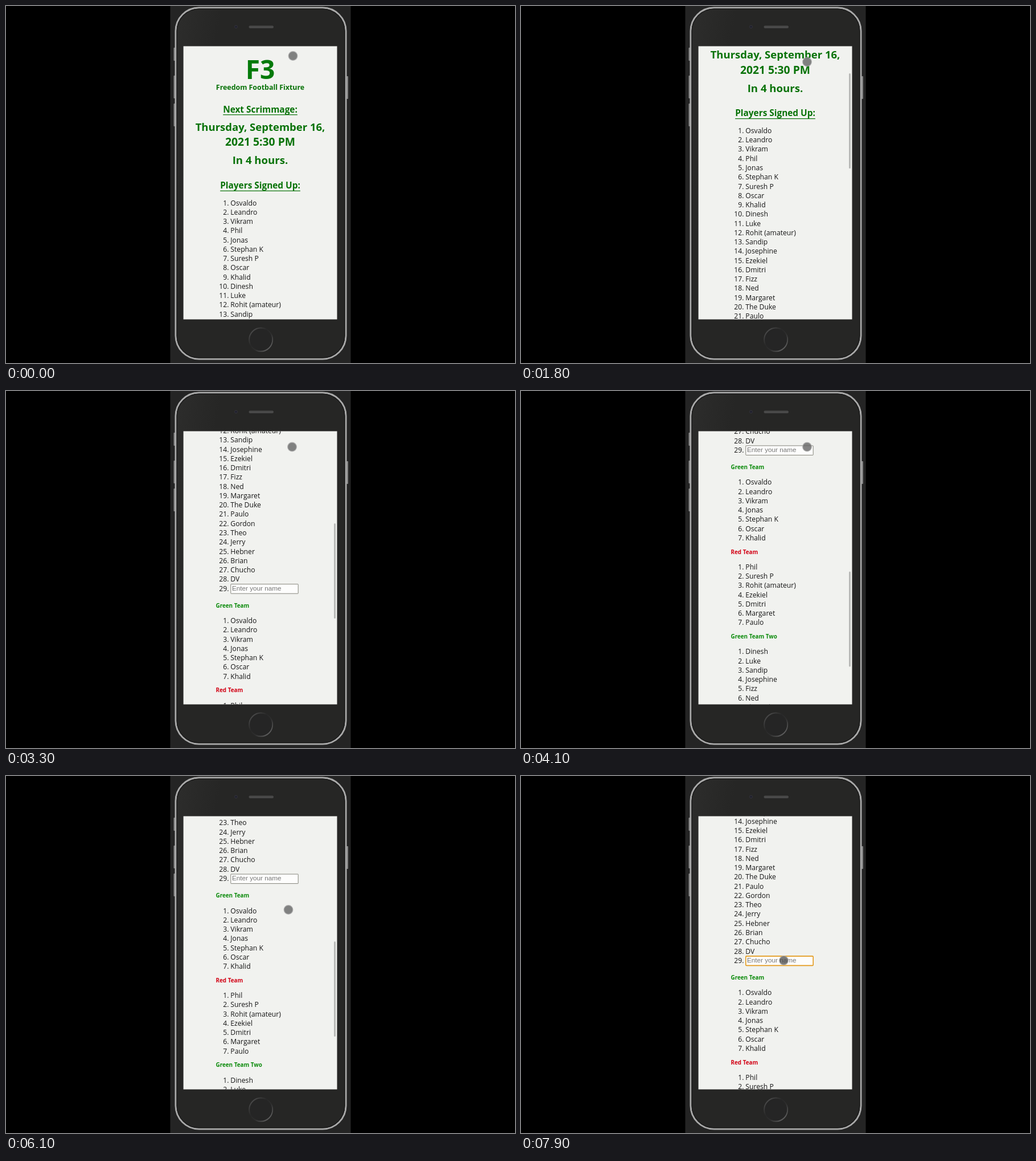
Write an HTML page that moves like this. It is 894 px wide and 626 px high and loops after 8000 ms.

```html
<!DOCTYPE html>
<html lang="en">
<head>
<meta charset="utf-8">
<title>Signup on a phone</title>
<style>
  html, body { margin: 0; width: 100%; height: 100%; overflow: hidden; background: #000; }
  svg { display: block; width: 894px; height: 626px; }
  text { font-family: "Open Sans", "Noto Sans", sans-serif; font-size: 12.2px; fill: #161616; white-space: pre; }
  .bold { font-weight: 700; fill: #077207; }
  .mid { text-anchor: middle; }
  .end { text-anchor: end; }
  .hint { font-family: "Liberation Sans", Arial, sans-serif; font-size: 11.7px; fill: #777; }
</style>
</head>
<body>
<svg viewBox="0 0 894 626">
  <defs>
    <clipPath id="screen"><rect x="311.6" y="70.6" width="269.9" height="478.9"/></clipPath>
    <linearGradient id="body" x1="0" y1="0" x2="1" y2="0.3">
      <stop offset="0" stop-color="#2d2d2c"/>
      <stop offset="0.25" stop-color="#262625"/>
      <stop offset="1" stop-color="#262625"/>
    </linearGradient>
    <linearGradient id="ring" x1="0" y1="0" x2="1" y2="1">
      <stop offset="0" stop-color="#5a5a5a"/>
      <stop offset="0.4" stop-color="#282828"/>
      <stop offset="0.6" stop-color="#2e2e2e"/>
      <stop offset="1" stop-color="#777"/>
    </linearGradient>
  </defs>
  <rect width="894" height="626"/>
  <rect x="288.5" width="317" height="626" fill="#242424"/>
  <g fill="#858585">
    <rect x="294.5" y="73" width="3" height="23" rx="1"/>
    <rect x="294.5" y="122" width="3" height="40" rx="1"/>
    <rect x="294.5" y="171" width="3" height="40" rx="1"/>
    <rect x="598" y="123" width="3" height="40" rx="1"/>
  </g>
  <rect x="298" y="3" width="299" height="616" rx="41" fill="url(#body)" stroke="#a9a9a9" stroke-width="3"/>
  <rect x="300.2" y="5.2" width="294.6" height="611.6" rx="38.8" fill="none" stroke="#1b1b1b" stroke-width="1.4"/>
  <circle cx="404" cy="36.5" r="2.5" fill="#20202c" stroke="#34343c"/>
  <rect x="426.5" y="34.5" width="43.5" height="4.5" rx="2.2" fill="#494949"/>
  <circle cx="447.7" cy="585" r="20.5" fill="#252525" stroke="url(#ring)" stroke-width="1.8"/>
  <g clip-path="url(#screen)">
    <rect x="311" y="70" width="271" height="480" fill="#f1f2ef"/>
    <g id="page"></g>
    <rect id="thumb" x="576" width="3" height="167" rx="1.5" fill="#b9bab8"/>
  </g>
  <circle id="touch" r="7.8" stroke="#aaa" stroke-opacity=".75" stroke-width="1.4"/>
</svg>
<script>
const LOOP = 8000, STEP = 100;
const ROW = 16.26, NOTCH = 64.9, NOTCH_TIME = 150, MAX_SCROLL = 866.5;
const GREEN = '#0a8a0a', RED = '#d20014';
const byId = id => document.getElementById(id);
const page = byId('page'), thumb = byId('thumb'), touch = byId('touch');

function add(tag, attrs, content = '') {
  const el = document.createElementNS('http://www.w3.org/2000/svg', tag);
  for (const key in attrs) el.setAttribute(key, attrs[key]);
  el.textContent = content;
  return page.appendChild(el);
}

function heading(content, y, size, fill = '#077207') {
  return add('text', { class: 'bold mid', x: 446.5, y, style: `font-size:${size}px;fill:${fill}` }, content);
}

function underlined(content, y) {
  const half = heading(content, y, 15.4).getComputedTextLength() / 2;
  add('rect', { x: 446.5 - half, y: y + 3.6, width: half * 2, height: 1.2, fill: '#077207' });
}

function numberLabel(n, y) {
  add('text', { class: 'end', x: 391.5, y }, n + '.');
}

function list(names, y) {
  names.forEach((name, i) => {
    numberLabel(i + 1, y + i * ROW);
    add('text', { x: 394.3, y: y + i * ROW }, name);
  });
}

const players = ['Osvaldo', 'Leandro', 'Vikram', 'Phil', 'Jonas', 'Stephan K', 'Suresh P', 'Oscar',
  'Khalid', 'Dinesh', 'Luke', 'Rohit (amateur)', 'Sandip', 'Josephine', 'Ezekiel', 'Dmitri', 'Fizz',
  'Ned', 'Margaret', 'The Duke', 'Paulo', 'Gordon', 'Theo', 'Jerry', 'Hebner', 'Brian', 'Chucho', 'DV'];

const teams = [
  ['Green Team', GREEN, [1, 2, 3, 5, 6, 8, 9]],
  ['Red Team', RED, [4, 7, 12, 15, 16, 19, 21]],
  ['Green Team Two', GREEN, [10, 11, 13, 14, 17, 18, 20]],
  ['Green Team Two', RED, [22, 23, 24, 25, 26, 27, 28]]
];

heading('F3', 127.5, 46, '#047a0a');
heading('Freedom Football Fixture', 146.5, 12.4);
underlined('Next Scrimmage:', 186.5);
heading('Thursday, September 16,', 218.8, 18.5);
heading('2021 5:30 PM', 245.3, 19.3);
heading('In 4 hours.', 277.3, 18.6);
underlined('Players Signed Up:', 320);
list(players, 349.6);
numberLabel(29, 349.6 + 28 * ROW);
const field = add('rect', { x: 394.8, y: 793, width: 118.4, height: 16.5, fill: '#fdfdfc' });
add('text', { class: 'hint', x: 397, y: 804.3 }, 'Enter your name');
teams.forEach(([title, color, members], i) => {
  const y = 834.2 + i * 148.5;
  add('text', { class: 'bold', x: 368.5, y, style: `font-size:9.9px;fill:${color}` }, title);
  list(members.map(n => players[n - 1]), y + 27.3);
});

// Wheel notches: start times of each step down and up
const down = [1450, 1670, 1890, 2110, 2500, 2800, 3100, 3400, 3600, 3800, 4000, 4200, 4400, 4550];
const up = [5450, 5650, 5850, 5995, 6300, 6500];
const FOCUS_TIME = 7600;

// Touch point stops: time, x, y
const stops = [[0, 504, 87.5], [900, 502.5, 98], [4900, 502.5, 98], [5400, 496, 234.5],
  [6700, 496, 234.5], [7400, 461.5, 323.5], [LOOP, 461.5, 323.5]];

const clamp = v => Math.max(0, Math.min(1, v));
const ease = v => { v = clamp(v); return v * v * (3 - 2 * v); };
const travel = (times, t) => times.reduce((sum, start) => sum + NOTCH * ease((t - start) / NOTCH_TIME), 0);

function touchAt(t) {
  const i = stops.findIndex((s, k) => k > 0 && t <= s[0]);
  const [t0, x0, y0] = stops[i - 1], [t1, x1, y1] = stops[i];
  const p = ease((t - t0) / (t1 - t0));
  return [x0 + (x1 - x0) * p, y0 + (y1 - y0) * p];
}

function barOpacity(t) {
  const last = [...down, ...up].filter(start => start < t).pop();
  return last === undefined ? 0 : clamp(1 - (t - last - NOTCH_TIME - 500) / 200);
}

function render(t) {
  const scroll = Math.min(MAX_SCROLL, travel(down, t)) - travel(up, t);
  page.setAttribute('transform', `translate(0 ${-scroll})`);
  thumb.setAttribute('y', 74 + 0.348 * scroll);
  thumb.setAttribute('opacity', barOpacity(t));

  const focused = t >= FOCUS_TIME;
  field.setAttribute('stroke', focused ? '#e39a1c' : '#85857c');
  field.setAttribute('stroke-width', focused ? 1.6 : 1);
  field.setAttribute('rx', focused ? 1.5 : 0.5);

  const [x, y] = touchAt(t);
  touch.setAttribute('cx', x);
  touch.setAttribute('cy', y);
  touch.setAttribute('fill', focused ? 'rgba(70,70,70,.72)' : 'rgba(100,100,100,.8)');
}

const began = performance.now();
function tick() {
  const t = (performance.now() - began) % LOOP;
  render(Math.floor(t / STEP) * STEP);
  requestAnimationFrame(tick);
}
tick();
</script>
</body>
</html>
```
